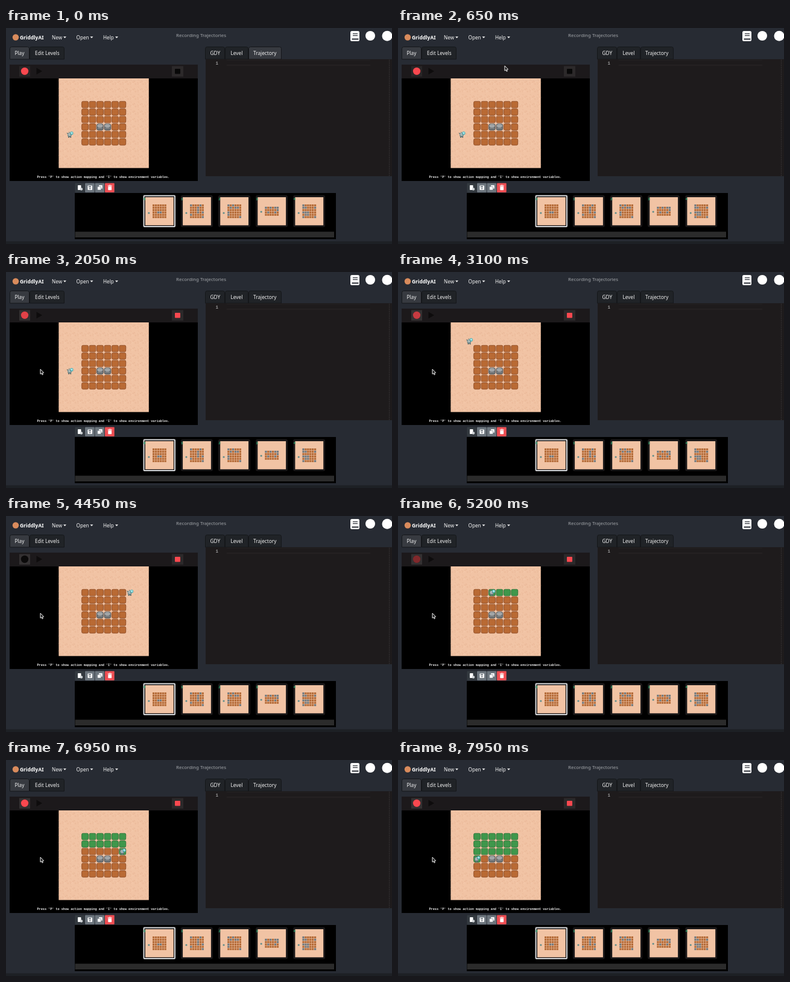
Animation, 640 px wide and 360 px high, one loop 8 s. Source, as an HTML page with a canvas:

```html
<!DOCTYPE html>
<html lang="en">
<head>
<meta charset="utf-8">
<title>Recording Trajectories</title>
<style>
html, body { margin: 0; width: 100%; height: 100%; overflow: hidden; background: #272b33; }
canvas { display: block; width: 640px; height: 360px; }
</style>
</head>
<body>
<canvas id="stage" width="640" height="360"></canvas>
<script>
const ctx = document.getElementById('stage').getContext('2d');
const LOOP = 8000, CLICK = 1250;
const SANS = '"Noto Sans", "Open Sans", sans-serif';
const MONO = '"Liberation Mono", "Noto Sans Mono", monospace';
const BOARD = { x: 87.4, y: 84, cell: 12.45 };
const RED = '#f9484f';

// Each leg: time of its first move, time between moves, moves.
const LEGS = [
  [2000, 200, 'UUUUUR'],
  [3170, 165, 'RRRRRRRD'],
  [4530, 200, 'LLLLLLD'],
  [5950, 170, 'RRRRRDLLLLLD']
];
const STEP = { U: [0, -1], D: [0, 1], L: [-1, 0], R: [1, 0] };

function rect(x, y, w, h, fill) {
  ctx.fillStyle = fill;
  ctx.fillRect(x, y, w, h);
}

function round(x, y, w, h, r, fill, stroke, line = 1) {
  ctx.beginPath();
  ctx.roundRect(x, y, w, h, r);
  if (fill) { ctx.fillStyle = fill; ctx.fill(); }
  if (stroke) { ctx.strokeStyle = stroke; ctx.lineWidth = line; ctx.stroke(); }
}

function oval(x, y, rx, ry, fill) {
  ctx.beginPath();
  ctx.ellipse(x, y, rx, ry, 0, 0, Math.PI * 2);
  ctx.fillStyle = fill;
  ctx.fill();
}

function poly(points, fill, stroke) {
  ctx.beginPath();
  points.forEach(([x, y]) => ctx.lineTo(x, y));
  ctx.closePath();
  ctx.fillStyle = fill;
  ctx.fill();
  if (stroke) { ctx.strokeStyle = stroke; ctx.lineWidth = 1; ctx.stroke(); }
}

function text(str, x, y, size, fill, weight = 400, family = SANS) {
  ctx.font = `${weight} ${size}px ${family}`;
  ctx.fillStyle = fill;
  ctx.fillText(str, x, y);
}

function random(seed) {
  return () => (seed = (seed * 16807) % 2147483647) / 2147483647;
}

function drawNav() {
  oval(16, 15.5, 5.2, 5.2, '#d98b5c');
  text('Griddly', 23, 19, 8.4, '#fff', 700);
  text('AI', 53.5, 19, 8.4, '#fff', 700);
  [['New', 76, 95], ['Open', 116.5, 139.5], ['Help', 161, 181]].forEach(([label, x, caret]) => {
    text(label, x, 18.5, 8.2, '#f4f4f4', 500);
    poly([[caret, 14.2], [caret + 5, 14.2], [caret + 2.5, 17]], '#f4f4f4');
  });
  text('Recording Trajectories', 282, 14.5, 7.95, '#a4a7ab');

  round(571, 5, 15, 17, 2.5, '#fff');
  rect(575, 9, 8, 1.2, '#272b33');
  rect(575, 12, 8, 1.2, '#272b33');
  rect(573.5, 17.5, 11, 2, '#272b33');
  oval(604, 13, 8, 8, '#fff');
  oval(632, 13.3, 8.5, 8.5, '#fff');
}

function tab(label, x, width, pad, active) {
  round(x + 0.5, 31.5, width - 1, 20.5, [3, 3, 0, 0], active ? '#373a40' : '#202327', '#15171a');
  text(label, x + pad, 45, 8.25, '#f2f2f2', 500);
}

function drawEditor() {
  rect(331, 52, 309, 195, '#1e1b1c');
  rect(366, 53, 238, 1, '#242122');
  rect(366, 61.5, 238, 1, '#2c2929');
  text('1', 347.5, 60.5, 7.5, '#d4d4d4', 400, MONO);
  for (let y = 53; y < 247; y += 3) rect(635, y, 1, 1.5, '#3a3839');
}

function drawToolbar(t) {
  rect(6, 61, 312, 23, '#1c191b');
  const recording = t >= CLICK;
  const glow = recording ? 0.5 + 0.5 * Math.cos((t - 950) / 1000 * Math.PI * 2) : 1;
  rect(22, 63.5, 18, 17.5, t >= 1050 ? '#343132' : '#292627');
  oval(31, 72, 6.2, 6.2, '#0b0a0a');
  ctx.globalAlpha = glow;
  oval(31, 72, 6.2, 6.2, RED);
  ctx.globalAlpha = 1;
  poly([[50.5, 66.5], [60, 72], [50.5, 77.5]], '#0e0c0d');
  rect(275, 63.5, 19, 17.5, '#2c292a');
  round(280, 68, 9, 8.5, 1, recording ? RED : '#080808');
}

function drawSand(x, y, cell) {
  rect(x, y, cell * 12, cell * 12, '#f1c3a4');
  if (cell < 6) return;
  const next = random(71);
  const strokes = Array.from({ length: 16 }, () => [next() * 11, next() * 11, next()]);
  ctx.lineWidth = 0.7;
  for (let i = 0; i < 144; i++) {
    const left = x + (i % 12) * cell, top = y + Math.floor(i / 12) * cell;
    strokes.forEach(([dx, dy, tone]) => {
      ctx.strokeStyle = tone > 0.5 ? '#e4af8f' : '#f8d1b5';
      ctx.beginPath();
      ctx.moveTo(left + dx, top + dy);
      ctx.lineTo(left + dx + 1.5, top + dy + 1.5);
      ctx.stroke();
    });
  }
}

function drawTile(x, y, green) {
  round(x + 0.9, y + 0.9, 10.8, 10.7, 2, green ? '#3f974b' : '#b96a34', green ? '#2d713a' : '#8d4b25', 0.9);
}

function drawRock(x, y) {
  round(x + 0.4, y + 0.5, 11.7, 11.5, 3.5, '#626567');
  oval(x + 6.2, y + 4.4, 4.7, 3.1, '#a1a5a7');
  rect(x + 2, y + 8, 8.4, 1.6, '#85898b');
}

function drawPlayer(x, y) {
  poly([[x + 0.8, y + 3], [x + 4, y + 4.5], [x + 2.6, y + 7]], '#5e7374');
  poly([[x + 4.5, y + 1], [x + 6.5, y + 4], [x + 4.5, y + 5]], '#6d8082');
  oval(x + 5.6, y + 7.1, 3.3, 3.8, '#71898a');
  oval(x + 5.5, y + 6, 2.4, 2, '#d3dfdc');
  oval(x + 9, y + 4.2, 2.7, 2.8, '#55b6bd');
  oval(x + 9.1, y + 3.9, 1.4, 1.4, '#c4f1ee');
  rect(x + 4.2, y + 5.3, 1, 1.3, '#273435');
  rect(x + 6.4, y + 5.3, 1, 1.3, '#273435');
  rect(x + 3.4, y + 10, 1.6, 1.7, '#435557');
  rect(x + 6.6, y + 10, 1.6, 1.7, '#435557');
}

function walk(t) {
  let col = 1, row = 7;
  const visited = new Set();
  for (const [start, gap, moves] of LEGS) {
    [...moves].forEach((move, i) => {
      if (t < start + i * gap) return;
      col += STEP[move][0];
      row += STEP[move][1];
      visited.add(col + ',' + row);
    });
  }
  return { col, row, visited };
}

function drawGame(t) {
  const { x, y, cell } = BOARD;
  const { col, row, visited } = walk(t);
  rect(6, 84, 312, 171, '#000');
  drawSand(x, y, cell);
  for (let r = 3; r < 9; r++) {
    for (let c = 3; c < 9; c++) {
      const draw = r === 6 && (c === 5 || c === 6) ? drawRock : drawTile;
      draw(x + c * cell, y + r * cell, visited.has(c + ',' + r));
    }
  }
  drawPlayer(x + col * cell, y + row * cell);
  text("Press 'P' to show action mapping and 'I' to show environment variables.",
    51.5, 249.7, 5.17, '#f0f0f0', 700, MONO);
}

function drawThumb(index) {
  const x = 229 + index * 62.1, cell = 3.9;
  const left = x + 2, top = 282, selected = index === 0;
  const next = random(index * 917 + 31);
  round(x - 0.5, 279.5, 51.5, 51.5, 1, '#191718', selected ? '#d5d7d9' : '#201e1f', selected ? 2 : 1);
  drawSand(left, top, cell);
  const lastRow = index === 3 ? 8 : 9;
  for (let r = index === 3 ? 4 : 3; r < lastRow; r++) {
    for (let c = 3; c < 9; c++) {
      const rock = index === 0 ? r === 6 && (c === 5 || c === 6) : next() < 0.12 + index * 0.06;
      rect(left + c * cell + 0.3, top + r * cell + 0.3, 3.3, 3.3, rock ? '#727b80' : '#b56c39');
    }
  }
  oval(left + 1.5 * cell, top + (index === 3 ? 6.5 : 7) * cell - 1, 1.5, 1.6, '#65908d');
  text(String(index), x - 1, 287, 6, '#31ad76', 700, MONO);
}

function drawLevels() {
  const shades = ['#343a40', '#6c757d', '#6c757d', '#ee4e53'];
  shades.forEach((shade, i) => round(114.5 + i * 16.5, 258.5, 15.7, 15.5, 1, shade));
  round(119, 262, 5.5, 8, 0.8, '#fff');
  oval(125, 268.5, 2.2, 2.2, '#cfd3d6');
  round(135.5, 262.5, 7.5, 7.5, 1, '#fff');
  rect(137, 263.5, 4, 2, '#6c757d');
  oval(139.2, 267.8, 1.2, 1.2, '#6c757d');
  round(154, 262, 5.8, 5.8, 0.8, '#fff');
  round(151.7, 264.3, 5.8, 5.8, 0.8, '#fff', '#6c757d', 0.7);
  rect(168.7, 262.5, 7, 1.2, '#fff');
  rect(170.8, 261.6, 2.8, 1, '#fff');
  round(169.3, 264.3, 5.8, 6, 0.8, '#fff');

  rect(114, 275, 433, 77, '#000');
  for (let i = 0; i < 5; i++) drawThumb(i);
  rect(114.5, 339.5, 429.5, 9.5, '#2b2b2b');
  rect(0, 355.5, 640, 4.5, '#1d2025');
}

function drawCursor(t) {
  if (t < 250) return;
  const glide = (from, to, start, end) => {
    const p = Math.min(1, Math.max(0, (t - start) / (end - start)));
    const e = p * p * (3 - 2 * p);
    return [from[0] + (to[0] - from[0]) * e, from[1] + (to[1] - from[1]) * e];
  };
  const button = [35, 76], rest = [57, 162];
  const [x, y] = t < CLICK ? glide([320, 50], button, 250, 1050) : glide(button, rest, 1400, 1800);
  const arrow = [[0, 0], [0, 8.2], [1.9, 6.6], [3.1, 9.4], [4.4, 8.8], [3.2, 6.1], [5.6, 5.9]];
  poly(arrow.map(([dx, dy]) => [x + dx, y + dy]), '#161616', '#f2f2f2');
}

function render(t) {
  rect(0, 0, 640, 360, '#272b33');
  drawNav();
  tab('Play', 6, 33, 8.5, true);
  tab('Edit Levels', 39, 58, 9, false);
  tab('GDY', 330, 33, 8.5, false);
  tab('Level', 363, 39, 9.5, false);
  tab('Trajectory', 402, 55, 8, t < 100);
  drawEditor();
  drawToolbar(t);
  drawGame(t);
  drawLevels();
  drawCursor(t);
}

const began = performance.now();
function tick() {
  render((performance.now() - began) % LOOP);
  requestAnimationFrame(tick);
}
tick();
</script>
</body>
</html>
```
